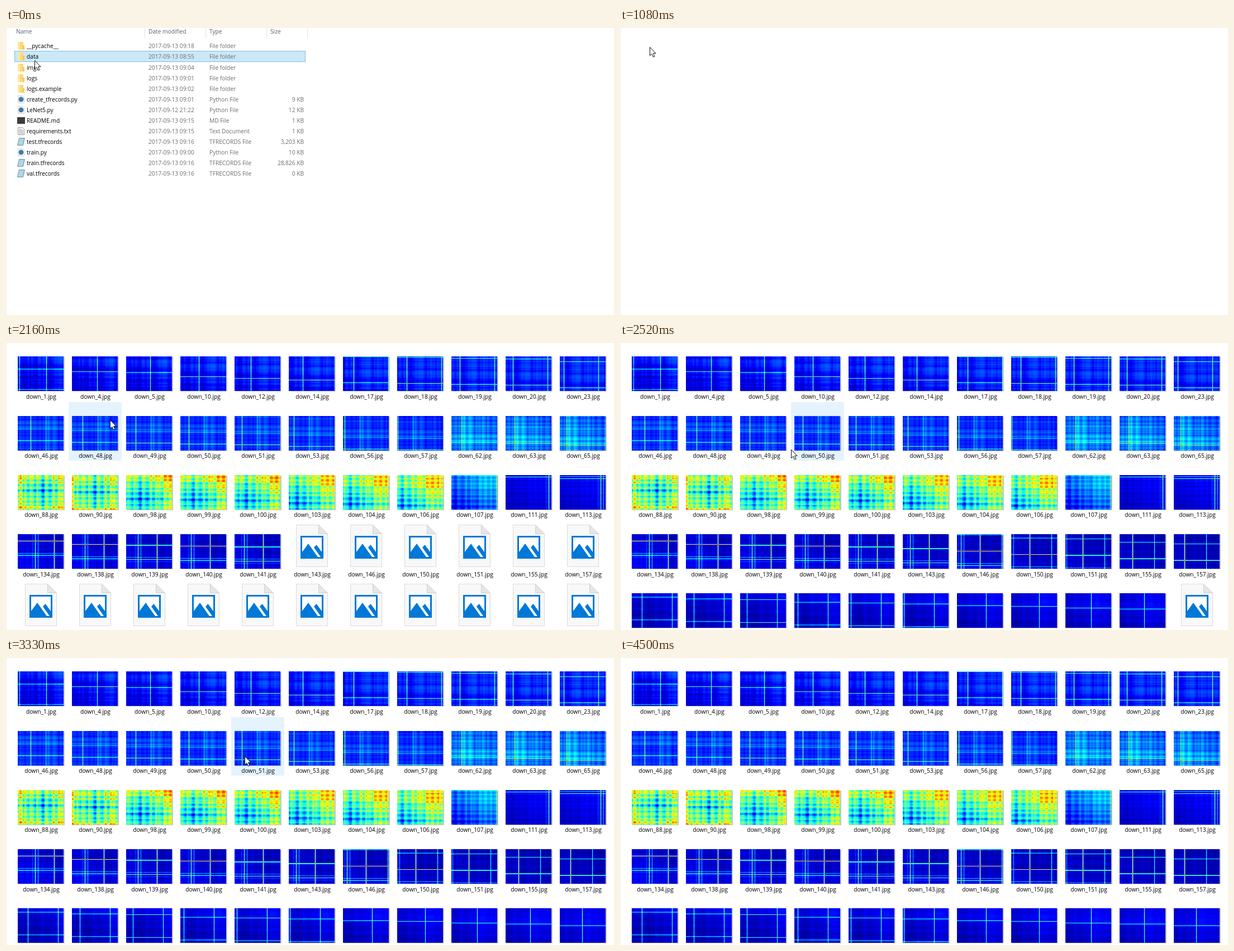
These frames come from a looping animation (1088 px wide and 515 px high, 6570 ms). An HTML page with a canvas:

```html
<!DOCTYPE html>
<html lang="en">
<head>
<meta charset="utf-8">
<title>Folder browsing</title>
<style>
  html, body { margin: 0; width: 100%; height: 100%; overflow: hidden; background: #fff; }
  canvas { display: block; }
</style>
</head>
<body>
<canvas id="stage" width="1088" height="515"></canvas>
<script>
const LOOP = 6570, STEP = 90, COLS = 11, W = 82, H = 62;
const ctx = document.getElementById('stage').getContext('2d');
const FONT = '10.2px "Open Sans", "Noto Sans", sans-serif';

// ---------- helpers ----------
const clamp = v => Math.max(0, Math.min(1, v));
const mix = (a, b, f) => a + (b - a) * f;

function rect(x, y, w, h, fill) {
  ctx.fillStyle = fill;
  ctx.fillRect(x, y, w, h);
}

function poly(x, y, pts, fill, stroke) {
  ctx.beginPath();
  pts.forEach(([px, py]) => ctx.lineTo(x + px, y + py));
  ctx.closePath();
  if (fill) { ctx.fillStyle = fill; ctx.fill(); }
  if (stroke) { ctx.strokeStyle = stroke; ctx.lineWidth = 1; ctx.stroke(); }
}

function label(text, x, y, color, align = 'left') {
  ctx.fillStyle = color;
  ctx.textAlign = align;
  ctx.fillText(text, x, y);
}

function random(seed) {
  return () => {
    seed = (seed * 1664525 + 1013904223) >>> 0;
    return seed / 4294967296;
  };
}

// ---------- file list ----------
const projectFiles = [
  ['folder', '__pycache__', '13 09:18', 'File folder'],
  ['folder', 'data', '13 08:55', 'File folder'],
  ['folder', 'imgs', '13 09:04', 'File folder'],
  ['folder', 'logs', '13 09:01', 'File folder'],
  ['folder', 'logs.example', '13 09:02', 'File folder'],
  ['python', 'create_tfrecords.py', '13 09:01', 'Python File', '9 KB'],
  ['python', 'LeNet5.py', '12 21:22', 'Python File', '12 KB'],
  ['dark', 'README.md', '13 09:15', 'MD File', '1 KB'],
  ['text', 'requirements.txt', '13 09:15', 'Text Document', '1 KB'],
  ['note', 'test.tfrecords', '13 09:16', 'TFRECORDS File', '3,203 KB'],
  ['python', 'train.py', '13 09:00', 'Python File', '10 KB'],
  ['note', 'train.tfrecords', '13 09:16', 'TFRECORDS File', '28,826 KB'],
  ['note', 'val.tfrecords', '13 09:16', 'TFRECORDS File', '0 KB']
];
const dataFiles = [
  ['folder', 'down', '13 08:55', 'File folder'],
  ['folder', 'up', '13 08:55', 'File folder']
];

const sheet = [[0, 0], [8, 0], [11, 3], [11, 13], [0, 13]];
const smallIcons = {
  folder(y) {
    rect(21, y - 7, 10, 14, '#fbd978');
    rect(21, y - 7, 4, 14, '#ffe79f');
    rect(30, y - 1, 3, 8, '#f3c95c');
  },
  python(y) {
    poly(21.5, y - 6.5, sheet, '#fafafa', '#d2d2d2');
    ctx.beginPath();
    ctx.arc(27, y, 4.5, 0, 7);
    ctx.fillStyle = '#3f7cac';
    ctx.fill();
  },
  dark(y) { rect(20, y - 6, 14, 12, '#3c3c3c'); },
  text(y) {
    poly(21.5, y - 6.5, sheet, '#fff', '#9a9a9a');
    for (let i = 0; i < 5; i++) rect(23, y - 4 + i * 2, i ? 8 : 5, 1, '#a8a8a8');
  },
  note(y) {
    poly(20.5, y - 6.5, [[3, 0], [13, 0], [10, 13], [0, 13]], '#9cc9dd', '#7b9cab');
    for (let i = 0; i < 4; i++) rect(24 - i * .6, y - 4 + i * 2.5, 7, 1, '#d3eaf3');
  }
};

function drawHeader() {
  ['Name', 'Date modified', 'Type', 'Size'].forEach((s, i) => {
    label(s, i ? 146 + 109 * i : 18, 10, '#53606f');
    rect(Math.min(248 + 109 * i, 539), 0, 1, 18, '#e2e2e2');
  });
}

function drawList(files, hover, selected) {
  drawHeader();
  files.forEach(([icon, name, date, type, size], i) => {
    const y = Math.round(32.4 + i * 19.05);
    if (i === selected) {
      rect(15, y - 10, 521, 20, '#84bde2');
      rect(16, y - 9, 519, 18, '#cbe8f8');
    } else if (i === hover) {
      rect(15, y - 10, 521, 20, '#e5f3ff');
    }
    smallIcons[icon](y);
    label(name, 37, y + 4, '#000');
    label('2017-09-' + date, 255, y + 4, '#6d6d6d');
    label(type, 364, y + 4, '#6d6d6d');
    if (size) label(size, 533, y + 4, '#6d6d6d', 'right');
  });
}

// ---------- heat map thumbnails ----------
// Every picture is a window on one signal, moved on by two samples per file
// number. A pixel adds the signal at its column and at its mirrored row.
const ids = [
  1, 4, 5, 10, 12, 14, 17, 18, 19, 20, 23,
  46, 48, 49, 50, 51, 53, 56, 57, 62, 63, 65,
  88, 90, 98, 99, 100, 103, 104, 106, 107, 111, 113,
  134, 138, 139, 140, 141, 143, 146, 150, 151, 155, 157,
  177, 179, 180, 183, 184, 185, 187, 188, 190, 191, 193
];
const spikes = [
  [5, 2.6], [53, 3.3], [115, 3.2], [142, 2.1], [294, 2.2],
  [299, 6.5], [304, 4], [333, 9], [372, 5.6], [426, 6]
];
const rnd = random(21);
const grain = Array.from({ length: 200 }, () => rnd() * 2 - 1);

function wave(p) {
  const n = Math.floor(p);
  return mix(grain[n], grain[n + 1], p - n);
}

function signal(t) {
  const level = .63 + .12 * Math.cos((t - 118) / 27);
  let s = Math.max(.1, level + .25 * wave(t / 11) + .3 * wave(t / 3));
  spikes.forEach(([at, height]) => {
    s = Math.max(s, height * Math.exp(-(((t - at) / .9) ** 2)));
  });
  return s;
}

function makeThumb(id) {
  const col = Array.from({ length: W }, (_, x) => signal(2 * id + x));
  const row = Array.from({ length: H }, (_, y) => signal(2 * id + (H - 1 - y) * W / H));
  const scale = 2.4 * Math.min(6, Math.max(...col));
  const pic = document.createElement('canvas');
  pic.width = W;
  pic.height = H;
  const c = pic.getContext('2d'), img = c.createImageData(W, H);
  for (let y = 0, k = 0; y < H; y++) {
    for (let x = 0; x < W; x++, k += 4) {
      const v = Math.min(.85, (col[x] + row[y]) / scale);
      for (let n = 0; n < 3; n++)
        img.data[k + n] = 255 * clamp(1.5 - Math.abs(4 * v - 3 + n));
      img.data[k + 3] = 255;
    }
  }
  c.putImageData(img, 0, 0);
  return pic;
}

const thumbs = ids.map(makeThumb);

// ---------- picture grid ----------
function drawPlaceholder(x, y) {
  const blue = '#0078d7';
  poly(x + .5, y + .5, [[0, 0], [40, 0], [56, 16], [56, 75], [0, 75]], '#f8f8f8', '#dadada');
  poly(x + .5, y + .5, [[40, 0], [56, 16], [40, 16]], '#e6e6e6', '#d0d0d0');
  rect(x + 8, y + 20, 41, 41, blue);
  rect(x + 11, y + 23, 35, 35, '#fff');
  poly(x, y, [[11, 58], [11, 49], [22, 34], [39, 58]], blue);
  poly(x, y, [[32, 41], [36.5, 36], [46, 49], [46, 58], [44, 58]], blue);
}

function drawGrid(loaded, cx, cy) {
  ids.forEach((id, i) => {
    const dx = i % COLS * 97, dy = Math.floor(i / COLS) * 106.2;
    const left = 15 + dx, top = Math.round(dy);
    if (cx >= left && cx < left + 95.5 && cy >= top && cy < top + 105)
      rect(left, top, 95, 105, '#e5f3ff');
    if (i < loaded) {
      const x = 21 + dx, y = Math.round(24.3 + dy);
      rect(x + 1, y + 1, W + 1, H, '#c4c8cc');
      ctx.drawImage(thumbs[i], x, y);
    } else {
      drawPlaceholder(34 + dx, Math.round(7 + dy));
    }
    if (dy < 400) label(`down_${id}.jpg`, 63 + dx, Math.round(100 + dy), '#000', 'center');
  });
}

// ---------- pointer ----------
// time, x, y
const path = [
  [0, 51, 58], [360, 51, 58], [450, 51, 63], [720, 53, 34], [1350, 53, 34],
  [1620, 108, 93], [1890, 186, 138], [2430, 186, 138], [2790, 664, 348],
  [2880, 729, 371], [2970, 678, 386], [3150, 380, 400], [3240, 256, 353],
  [3330, 427, 176], [3420, 734, 69], [3510, 938, 168], [3600, 790, 440],
  [3780, 299, 378], [3870, 190, 300], [4050, 374, 166], [4140, 809, 249],
  [4230, 1004, 448], [4320, 1083, 490], [4410, 1083, 490], [4500, 1200, 600],
  [LOOP, 1200, 600]
];
const arrow = [[0, 0], [0, 15], [3.5, 12], [6, 17.5], [8.5, 16.5], [6, 11], [10.5, 11]];

function pointer(t) {
  const k = path.findIndex(p => p[0] > t);
  const [t0, x0, y0] = path[k - 1], [t1, x1, y1] = path[k];
  const f = (t - t0) / (t1 - t0);
  return [Math.round(mix(x0, x1, f)), Math.round(mix(y0, y1, f))];
}

// ---------- playback ----------
function draw(t) {
  const [cx, cy] = pointer(t);
  rect(0, 0, 1088, 515, '#fff');
  rect(0, 0, 1, 515, '#f0f0f0');
  ctx.font = FONT;
  const row = Math.floor((cy - 23) / 19.05);
  if (t < 90) drawList(projectFiles, -1, 1);
  else if (t < 180) drawHeader();
  else if (t < 1080) drawList(dataFiles, row, t < 900 ? -1 : 0);
  else if (t >= 1170) drawGrid(14 + (t - 1620) / STEP * 4, cx, cy);
  poly(cx + .5, cy + .5, arrow, '#fff', '#111');
}

let shown = -1;
function tick() {
  const step = Math.floor(performance.now() % LOOP / STEP);
  if (step !== shown) {
    shown = step;
    draw(step * STEP);
  }
  requestAnimationFrame(tick);
}
tick();
</script>
</body>
</html>
```
